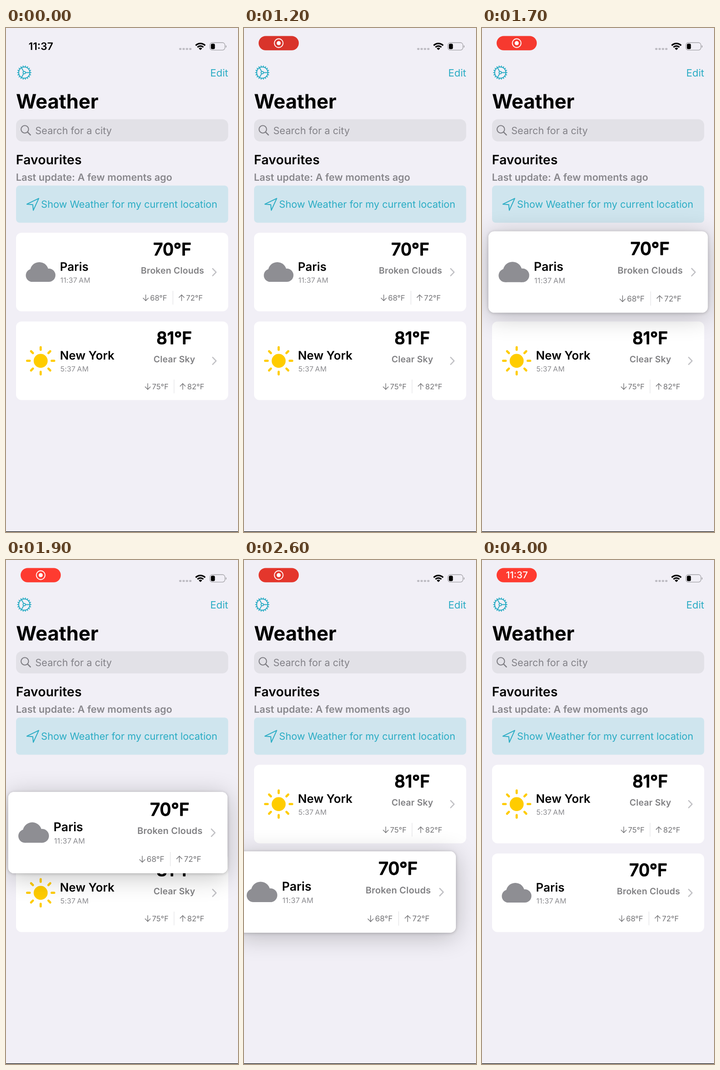
Recreate the animation shown at these times as an HTML page with a canvas. Size 508 by 1102 pixels, loop 4.1 s.

```html
<!DOCTYPE html>
<html lang="en">
<head>
<meta charset="utf-8">
<title>Weather favourites</title>
<style>
  html, body { margin: 0; width: 100%; height: 100%; overflow: hidden; background: #f1eff6; }
  canvas { display: block; width: 508px; height: 1102px; }
</style>
</head>
<body>
<canvas id="stage"></canvas>
<script>
const W = 508, H = 1102, LOOP = 4100, STEP = 100;
const TEAL = '#2aacc4', GREY = '#8a8a8e', INK = '#000';
const LEFT = 22, WIDTH = 464.5, CARD_H = 171.8, MID_X = 254, MID_Y = 86;
const SLOTS = [447.7, 641.7];
const BASE = 14;

const canvas = document.getElementById('stage');
const ctx = canvas.getContext('2d');
const dpr = window.devicePixelRatio || 1;
canvas.width = W * dpr;
canvas.height = H * dpr;

const mix = (a, b, p) => a + (b - a) * p;
const ramp = (t, a, b) => Math.min(1, Math.max(0, (t - a) / (b - a)));
const smooth = p => p * p * (3 - 2 * p);
const easeOut = p => 1 - (1 - p) ** 3;

function box(x, y, w, h, r, fill) {
  ctx.beginPath();
  ctx.roundRect(x, y, w, h, r);
  ctx.fillStyle = fill;
  ctx.fill();
}

function disc(x, y, r, fill) {
  ctx.beginPath();
  ctx.arc(x, y, r, 0, Math.PI * 2);
  ctx.fillStyle = fill;
  ctx.fill();
}

function ring(x, y, r, width, color) {
  ctx.beginPath();
  ctx.arc(x, y, r, 0, Math.PI * 2);
  ctx.lineWidth = width;
  ctx.strokeStyle = color;
  ctx.stroke();
}

function line(points, width, color, closed = false) {
  ctx.beginPath();
  points.forEach(([x, y]) => ctx.lineTo(x, y));
  if (closed) ctx.closePath();
  ctx.lineWidth = width;
  ctx.strokeStyle = color;
  ctx.lineCap = ctx.lineJoin = 'round';
  ctx.stroke();
}

// Type is set at one base size and scaled, so its proportions stay constant.
function text(str, x, y, size, weight, color, { align = 'left', track = 0, round = 0 } = {}) {
  const k = size / BASE;
  ctx.save();
  ctx.translate(x, y);
  ctx.scale(k, k);
  ctx.font = `${weight} ${BASE}px Inter, "Liberation Sans", sans-serif`;
  ctx.textRendering = 'geometricPrecision';
  ctx.letterSpacing = `${track * BASE}px`;
  ctx.textAlign = align;
  ctx.fillStyle = ctx.strokeStyle = color;
  ctx.fillText(str, 0, 0);
  if (round) {
    ctx.lineWidth = round / k;
    ctx.lineJoin = 'round';
    ctx.strokeText(str, 0, 0);
  }
  ctx.restore();
}

function spokes(x, y, count, r1, r2, width, color) {
  for (let i = 0; i < count; i++) {
    const a = i * Math.PI * 2 / count;
    const c = Math.cos(a), s = Math.sin(a);
    line([[x + c * r1, y + s * r1], [x + c * r2, y + s * r2]], width, color);
  }
}

function sun(x, y) {
  disc(x, y, 15.3, '#ffcc00');
  spokes(x, y, 8, 24, 29.7, 4.8, '#ffcc00');
}

function cloud(x, y) {
  const c = '#8e8e93';
  disc(x - 18.3, y + 7.2, 14.2, c);
  disc(x - 3, y - 1.6, 20.2, c);
  disc(x + 17.8, y + 6.8, 14.6, c);
  box(x - 18.3, y, 36, 21.4, 0, c);
}

function arrow(x, y, dir) {
  const tip = y + 6.4 * dir, c = '#737376';
  line([[x, y - 6.4 * dir], [x, tip]], 1.4, c);
  line([[x - 5.7, tip - 5.7 * dir], [x, tip], [x + 5.7, tip - 5.7 * dir]], 1.4, c);
}

const PARIS = {
  name: 'Paris', time: '11:37\u2009AM', temp: '70°F', sky: 'Broken Clouds',
  low: '68°F', high: '72°F', mid: 364.2, lowShift: 0, shift: 0, icon: cloud
};
const NEW_YORK = {
  name: 'New York', time: '5:37\u2009AM', temp: '81°F', sky: 'Clear Sky',
  low: '75°F', high: '82°F', mid: 368.3, lowShift: 4.4, shift: 2.5, icon: sun
};

function shadow(alpha, blur, dy) {
  ctx.save();
  ctx.shadowColor = `rgba(0,0,0,${alpha})`;
  ctx.shadowBlur = blur * dpr;
  ctx.shadowOffsetY = dy * dpr;
  box(LEFT, 0, WIDTH, CARD_H, 12, '#fff');
  ctx.restore();
}

function card(city, cx, cy, scale = 1, lift = 0) {
  ctx.save();
  ctx.translate(cx, cy);
  ctx.scale(scale, scale);
  ctx.translate(-MID_X, -MID_Y);
  if (lift > 0) {
    shadow(0.24 * lift, 54, 8);
    shadow(0.22 * lift, 7, 1);
  }
  box(LEFT, 0, WIDTH, CARD_H, 12, '#fff');
  city.icon(75.9, MID_Y);
  text(city.name, 118, 83.2, 25.8, 600, INK);
  text(city.time, 119, 109.2, 15.6, 400, GREY, { track: 0.02 });
  text(city.temp, city.mid, 49.6, 37, 500, INK, { align: 'center', round: 1.5 });
  text(city.sky, city.mid + 0.3, 89.2, 19.3, 600, '#808083', { align: 'center', track: 0.01 });
  arrow(306 + city.lowShift, 142.2, 1);
  text(city.low, 315.4 + city.lowShift, 148, 16.5, 400, '#737376');
  box(365 + city.shift, 127, 1, 30, 0, '#dedee1');
  arrow(384.5 + city.shift, 142.2, -1);
  text(city.high, 394.3 + city.shift, 148, 16.5, 400, '#737376');
  line([[452.5, 78.4], [460, 86.2], [452.5, 94]], 2.5, '#c1c1c5');
  ctx.restore();
}

function recordPill(t) {
  const show = easeOut(ramp(t, 150, 450));
  if (show < 1) {
    ctx.globalAlpha = 1 - show;
    text('11:37', 76.3, 48, 22.6, 600, INK, { align: 'center' });
  }
  if (show > 0) {
    const glow = 0.5 + 0.5 * Math.cos(t * Math.PI / 1000);
    const rgb = [mix(213, 255, glow), mix(51, 59, glow), mix(42, 48, glow)].map(Math.round);
    const swap = ramp(t, 3080, 3400);
    ctx.globalAlpha = show;
    box(32, 17.5, 88, 31.2, 15.6, `rgb(${rgb})`);
    ctx.globalAlpha = show * (1 - swap);
    ring(76, 33.1, 9.6, 1.9, '#fff');
    disc(76, 33.1, 4.5, '#fff');
    ctx.globalAlpha = swap;
    text('11:37', 76.5, 40.3, 20.6, 500, '#fff', { align: 'center' });
  }
  ctx.globalAlpha = 1;
}

function statusIcons() {
  for (let i = 0; i < 4; i++) box(379.2 + i * 7.3, 43.8, 5, 4.2, 1.4, '#bdbbc2');

  const up = -Math.PI / 2, half = 0.8;
  ctx.strokeStyle = INK;
  ctx.lineCap = 'butt';
  for (const [r, w] of [[14.4, 3.3], [8.9, 3.3], [2.6, 5.2]]) {
    ctx.beginPath();
    ctx.arc(425.7, 48.3, r, up - half, up + half);
    ctx.lineWidth = w;
    ctx.stroke();
  }

  ctx.beginPath();
  ctx.roundRect(446.4, 32, 33, 16.4, 5.5);
  ctx.lineWidth = 1.3;
  ctx.strokeStyle = '#a3a2a7';
  ctx.stroke();
  box(448.6, 34.2, 8.8, 12, 3, INK);
  box(481, 37.7, 1.7, 5.2, [0, 1.7, 1.7, 0], '#a3a2a7');
}

function header() {
  ring(40, 97.5, 12.2, 2, TEAL);
  spokes(40, 97.5, 18, 13, 14.8, 2, TEAL);
  spokes(40, 97.5, 3, 3.4, 11.5, 1.9, TEAL);
  ring(40, 97.5, 2.7, 1.8, TEAL);
  text('Edit', 486.5, 105.6, 22, 400, TEAL, { align: 'right' });
  text('Weather', 22, 176, 43.4, 700, INK, { track: -0.002 });

  box(LEFT, 199.5, WIDTH, 48.5, 13, '#e2e1e7');
  ring(41.2, 221.5, 8.2, 2.1, '#7e7d83');
  line([[47.3, 227.6], [53.5, 233.8]], 2.4, '#7e7d83');
  text('Search for a city', 64, 232, 21.6, 400, '#828187');

  text('Favourites', 21.8, 298, 28.2, 600, INK, { track: 0.004 });
  text('Last update: A few moments ago', 21.8, 333.5, 21.6, 600, '#88878c', { track: 0.001 });

  box(LEFT, 344.5, WIDTH, 81.3, 8, '#cfe5ee');
  line([[71.7, 372.6], [45.8, 385.2], [58.6, 386.3], [59.8, 398.6]], 2, TEAL, true);
  text('Show Weather for my current location', 76.8, 393, 21.6, 400, TEAL, { track: -0.001 });
}

// Position, size and height of the dragged card.
function dragState(t) {
  const [from, to] = SLOTS.map(y => y + MID_Y);
  const move = smooth(ramp(t, 1750, 2150));
  const drift = smooth(ramp(t, 2400, 2600));
  const drop = easeOut(ramp(t, 3000, 3290));
  const raise = easeOut(ramp(t, 1300, 1650));
  const x = mix(MID_X, 224.5, move) - drift;
  const y = mix(from, 731, move) - 5 * drift;
  return {
    x: mix(x, MID_X, drop),
    y: mix(y, to, drop),
    scale: 1 + 0.0335 * raise * (1 - drop),
    lift: raise * (1 - ramp(t, 3000, 3320))
  };
}

function draw(t) {
  ctx.setTransform(dpr, 0, 0, dpr, 0, 0);
  ctx.fillStyle = '#f1eff6';
  ctx.fillRect(0, 0, W, H);
  recordPill(t);
  statusIcons();
  header();

  const rise = easeOut(ramp(t, 1930, 2300));
  card(NEW_YORK, MID_X, mix(SLOTS[1], SLOTS[0], rise) + MID_Y);
  const d = dragState(t);
  card(PARIS, d.x, d.y, d.scale, d.lift);

  ctx.fillStyle = INK;
  ctx.fillRect(0, H - 1.2, W, 1.2);
}

const start = performance.now();
function tick() {
  const t = (performance.now() - start) % LOOP;
  draw(Math.floor(t / STEP) * STEP);
  requestAnimationFrame(tick);
}
tick();
</script>
</body>
</html>
```
